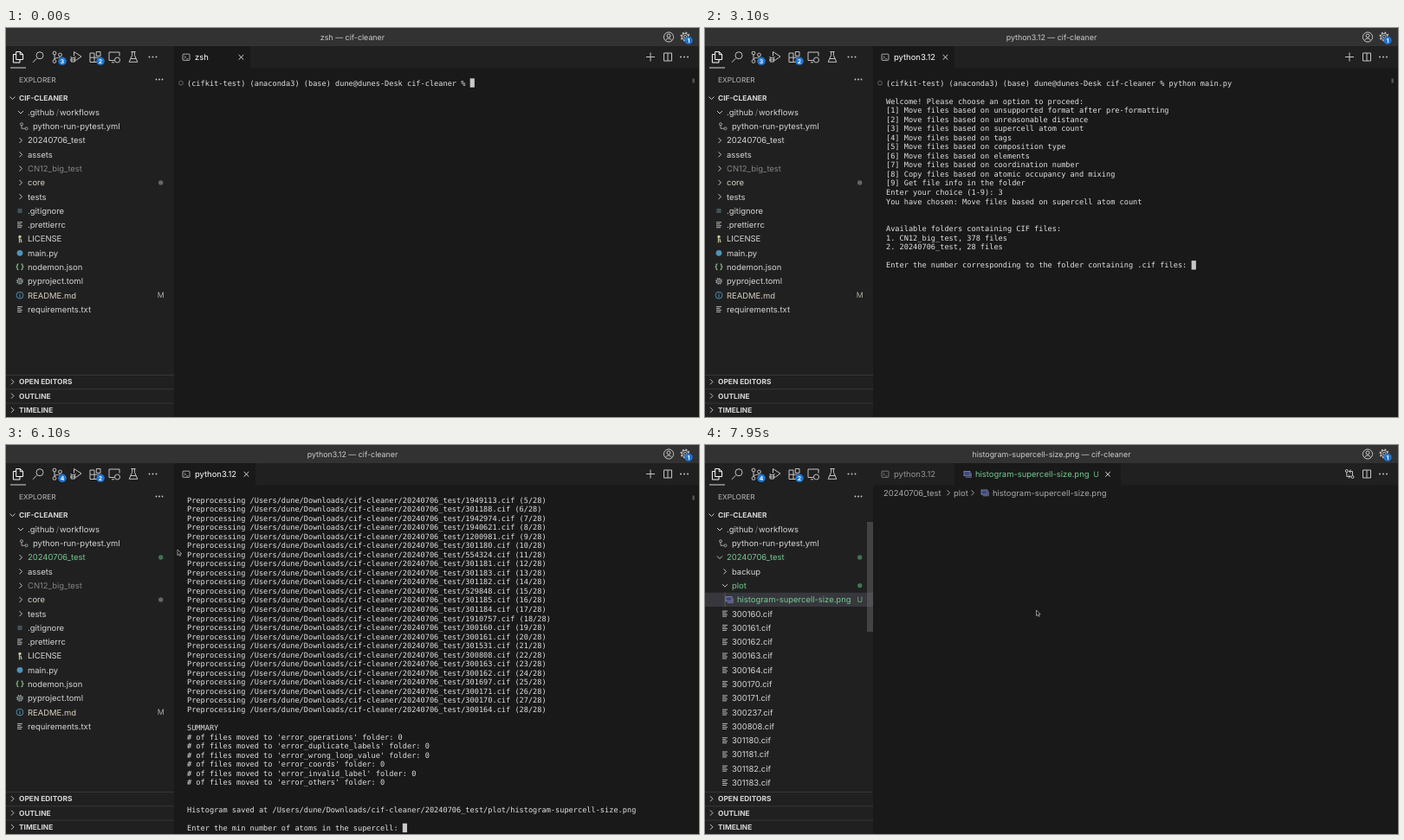
These frames come from a looping animation (800x450 px, 8 s). An HTML page:

```html
<!DOCTYPE html>
<html lang="en">
<head>
<meta charset="utf-8">
<title>Terminal session</title>
<style>
html, body { margin: 0; width: 100%; height: 100%; overflow: hidden; background: #191919; }
svg { display: block; width: 100vw; height: 100vh; }
text { font: 9.45px Inter, sans-serif; white-space: pre; text-rendering: geometricPrecision; }
.term text { font: 8.62px "DejaVu Sans Mono", monospace; fill: #e2e2e2; }
</style>
</head>
<body>
<svg id="stage" viewBox="0 0 800 450"></svg>
<script>
const LOOP = 8000, TICK = 50;
const ROW = 16.28, LINE = 10.54, CHAR = 5.19, ROWS = 37;
const GREEN = '#73c991', TAN = '#d8d1bd', GREY = '#c5c5c5', TEXT = '#d6d6d6', SIDE = '#202021', EDIT = '#191919';
const PNG = 'histogram-supercell-size.png';
const ROOT = '/Users/dune/Downloads/cif-cleaner/20240706_test';

// Terminal contents
const PROMPT = '(cifkit-test) (anaconda3) (base) dune@dunes-Desk cif-cleaner % ';
const CIFS = ('300237 301710 1955459 RhSb2 1949113 301188 1942974 1940621 1200981 301180 554324 301181 ' +
  '301183 301182 529848 301185 301184 1910757 300160 300161 301531 300808 300163 300162 301697 ' +
  '300171 300170 300164').split(' ');
const numbered = list => list.map((s, i) => `[${i + 1}] ${s}`);
const LOG = [
  PROMPT + 'python main.py', '',
  'Welcome! Please choose an option to proceed:',
  ...numbered(['unsupported format after pre-formatting', 'unreasonable distance', 'supercell atom count',
    'tags', 'composition type', 'elements', 'coordination number'].map(s => 'Move files based on ' + s)
    .concat('Copy files based on atomic occupancy and mixing', 'Get file info in the folder')),
  'Enter your choice (1-9): 3',
  'You have chosen: Move files based on supercell atom count', '', '',
  'Available folders containing CIF files:',
  '1. CN12_big_test, 378 files',
  '2. 20240706_test, 28 files', '',
  'Enter the number corresponding to the folder containing .cif files: 2',
  '='.repeat(26) + 'SUPERCELL' + '='.repeat(29),
  'Process for this option:', '',
  ...numbered(['Compute the number of atoms in the supercell for each .cif file',
    'View histogram of supercell atom counts', 'Enter the supercell min and max atom counts',
    'Move files above the min and below the max to separate folder']),
  '='.repeat(66), '', '',
  `CIF Preprocessing in ${ROOT} begun...`, '',
  ...CIFS.map((c, i) => `Preprocessing ${ROOT}/${c}.cif (${i + 1}/28)`), '',
  'SUMMARY',
  ...['operations', 'duplicate_labels', 'wrong_loop_value', 'coords', 'invalid_label', 'others']
    .map(s => `# of files moved to 'error_${s}' folder: 0`), '', '',
  `Histogram saved at ${ROOT}/plot/${PNG}`, '',
  'Enter the min number of atoms in the supercell: '
];

// Drawing helpers
const esc = s => s.replace(/&/g, '&amp;').replace(/</g, '&lt;');
const rect = (x, y, w, h, fill, more = '') => `<rect x="${x}" y="${y}" width="${w}" height="${h}" fill="${fill}" ${more}/>`;
const dot = (x, y, r, fill, more = '') => `<circle cx="${x}" cy="${y}" r="${r}" fill="${fill}" ${more}/>`;
const ring = (x, y, r, c, w = 1) => dot(x, y, r, 'none', `stroke="${c}" stroke-width="${w}"`);
const line = (d, x, y, c = GREY, w = 1) =>
  `<path d="${d}" transform="translate(${x} ${y})" fill="none" stroke="${c}" stroke-width="${w}"/>`;
const text = (x, y, s, fill = TEXT, size = 9.45, more = '') =>
  `<text x="${x}" y="${y + size * .36}" style="fill:${fill};font-size:${size}px;${more}">${esc(s)}</text>`;
const BOLD = 'font-weight:700;';
const MID = 'text-anchor:middle;';

const dots = (x, y, gap = 4) => [-gap, 0, gap].map(d => dot(x + d, y, .95, GREY)).join('');
const chevron = (x, y, open, c = GREY) => line(open ? 'M-3-1.5L0 1.5L3-1.5' : 'M-1.5-3L1.5 0L-1.5 3', x, y, c);
const cross = (x, y) => line('M-2.8-2.8L2.8 2.8M2.8-2.8L-2.8 2.8', x, y, '#ddd');
const badge = (x, y, n, r = 4.8) => dot(x, y, r, '#1f75cf') + text(x, y, n, '#fff', 6.8, BOLD + MID);
const gear = (x, y, r, c) => ring(x, y, r * .8, c, .9) + ring(x, y, r * .35, c, .9) +
  dot(x, y, r, 'none', `stroke="${c}" stroke-width="${r * .4}" stroke-dasharray="${r * .39}"`);
const picture = (x, y) => rect(x - 4, y - 3.3, 7, 5.2, '#3a4a78', 'stroke="#8f86bd" stroke-width=".8"') +
  line('M-2 3.5H4.2V-1.5', x, y, '#8f86bd', .8);
const shell = (x, y, c) => rect(x - 4, y - 3.6, 8, 7.2, 'none', `rx=".8" stroke="${c}" stroke-width=".8"`) +
  line('M-2.3-1.7L-.6 0L-2.3 1.7M.2 2H2.3', x, y, c, .8);
const split = (x, y) => line('M-4.5-4.5H4.5V4.5H-4.5zM0-4.5V4.5', x, y);

const FILE_ICONS = {
  flow: (x, y) => ring(x - 2.5, y - 2.5, 1.5, '#a9b0b3', .9) + ring(x + 3, y + 2.5, 1.5, '#a9b0b3', .9) +
    line('M-2.5-1V2.5H1.5', x, y, '#a9b0b3', .9),
  text: (x, y) => line('M-3-3H3M-3-1H1.5M-3 1H3M-3 3H2', x, y, '#c3c7c9', .9),
  git: (x, y) => rect(x - 2.6, y - 2.6, 5.2, 5.2, '#41535b'),
  key: (x, y) => dot(x, y - 2.5, 1.7, '#cbcb9a') + line('M-.5-1V4.5M1 0L2 4', x, y, '#b9bb98', 1.3),
  py: (x, y) => dot(x, y, 3.4, '#4f93b8'),
  json: (x, y) => text(x, y - .3, '{ }', '#8dc18a', 8.5, BOLD + MID),
  gear: (x, y) => gear(x, y, 3.3, '#9aa5a8'),
  info: (x, y) => ring(x, y, 3.9, '#519aba', .9) + line('M0-.8V2.4M0-2.4V-1.5', x, y, '#519aba', 1),
  png: picture
};

function titleBar(title) {
  return rect(0, 0, 800, 21, '#323233') + text(400, 10.5, title, '#ccc', 8.9, MID) +
    ring(765, 10.5, 5.6, GREY) + ring(765, 9, 2, GREY) + line('M-3.6 4.2C-2 .6 2 .6 3.6 4.2', 765, 10.5) +
    gear(784, 10, 4.6, GREY) + badge(788, 14.3, '1', 4.6);
}

function activityBar(changes) {
  const y = 33.5;
  return line('M-2.3-6H2.5L5.6-3V3H-2.3zM-2.3-3H-5.6V6.5H2V3M2.3-6V-2.8H5.6', 14, y, '#fff') +
    rect(5, 45.5, 18, 1, '#d8d8d8') +
    line('M-1.7 1.7L-6 6.3M6-1.8A4 4 0 1 1-2-1.8A4 4 0 1 1 6-1.8', 37, y) +
    ring(56, 29, 1.9, GREY) + ring(56, 38.5, 1.9, GREY) + ring(62.5, 31, 1.9, GREY) +
    line('M-3-2.6V3M3.5-.6C3.5 2-3 0-3 3', 59, y) + badge(65, 38.3, changes) +
    line('M-2.5-1V-6L6-.5L-.5 4M-5.8 1.2H-1.5V5.5H-5.8zM-7 3.4H-.5M-6.5-.5L-5 1.2M-.5-.5L-2 1.2', 81, y) +
    line('M-6-4.5H-1V6H-6zM-6 .7H4.5V6H-1M1.3-6H6V-1.2H1.3z', 103, y) + badge(109, 38.3, '2') +
    line('M0 4H-6V-5.5H6V-1M-3 6.3H0', 125, y) + ring(128.5, 37, 3, GREY) +
    line('M-2.6-6H2.6M-1.4-6V-2L-4.8 5.8H4.8L1.4-2V-6M-3 2H3', 147, y) + dots(169.5, y);
}

// Explorer rows: [name, icon or open flag, depth, colour, mark]
function treeRows(s) {
  const head = [['.github/workflows', true, 0], ['python-run-pytest.yml', 'flow', 1]];
  const mark = s.tracked ? 'dot' : '';
  const folder = ['20240706_test', s.open, 0, s.tracked ? GREEN : TEXT, mark];
  if (s.open) {
    const files = '300160 300161 300162 300163 300164 300170 300171 300237 300808 301180 301181 301182 301183 301184';
    return [...head, folder, ['backup', false, 1],
      ['plot', s.plot, 1, s.picked === 4 ? '#fff' : GREEN, 'dot'],
      ...(s.plot ? [[PNG, 'png', 2, GREEN, 'U']] : []),
      ...files.split(' ').map(n => [n + '.cif', 'text', 1])].slice(0, 19);
  }
  return [...head, folder, ['assets', false, 0], ['CN12_big_test', false, 0, '#828282'],
    ['core', false, 0, TAN, 'dot'], ['tests', false, 0], ['.gitignore', 'git', 0], ['.prettierrc', 'text', 0],
    ['LICENSE', 'key', 0], ['main.py', 'py', 0], ['nodemon.json', 'json', 0], ['pyproject.toml', 'gear', 0],
    ['README.md', 'info', 0, TAN, 'M'], ['requirements.txt', 'text', 0]];
}

function treeRow([name, kind, depth, color = TEXT, mark], i, s) {
  const y = 97.5 + i * ROW, top = y - ROW / 2, x = 25 + depth * 6;
  let out = '';
  if (s.picked === i) {
    out += s.dropped ? rect(0, top, 194, ROW, '#37373d')
      : rect(.5, top + .5, 193, ROW - 1, '#04395e', 'stroke="#2478bd"');
  } else if (s.hover === i) out += rect(0, top, 194, ROW, '#2a2d2e');
  if (depth === 2) out += rect(22.7, top, .7, ROW, '#666');
  out += typeof kind === 'boolean' ? chevron(x - 8, y, kind, i === s.picked ? '#fff' : GREY)
    : FILE_ICONS[kind](x - (depth ? (depth === 2 ? 9 : kind === 'flow' ? 10.5 : 8) : 9), y);
  if (name.includes('/')) {
    out += text(x, y, '.github') + text(57.8, y, '/', '#777') + text(62, y, 'workflows');
  } else out += text(x, y, name, color);
  if (mark === 'dot') out += dot(178.7, y, 2.7, i === s.picked ? '#8aa5b8' : color === TAN ? '#68665f' : '#417353');
  else if (mark) out += text(178.7, y, mark, mark === 'U' ? '#68b583' : '#b0aa99', 8.9, MID);
  return out;
}

function sidebar(s) {
  let out = rect(0, 21, 194, 429, SIDE) + activityBar(s.tracked ? '4' : '3') +
    text(15, 59.5, 'EXPLORER', '#bbb', 8.35) + dots(177, 59.5, 3.5) +
    chevron(7.5, 81, true) + text(15, 81, 'CIF-CLEANER', TEXT, 8.35, BOLD);
  if (s.tools) {
    out += line('M-1 4.5H-3.5V-4.5H1L3.5-2V0M1 3H5M3 1V5', 130, 80.5) +
      line('M-1 4H-5V-4H-1.5L0-2.5H5V0M1 3H5M3 1V5', 148, 80.5) +
      line('M3.5-2A4 4 0 1 0 4 1M4-4.5V-1.7H1', 166, 80.5) +
      line('M-4-1.5H2V4.5H-4zM-2-1.5V-4H4.5V2H2M-2.5 1.5H.5', 183, 80.5);
  }
  out += treeRows(s).map((r, i) => treeRow(r, i, s)).join('');
  if (s.open) out += rect(187, 89, 7, 127, '#797979', 'opacity=".4"');
  out += rect(0, 401, 194, 49, SIDE);
  ['OPEN EDITORS', 'OUTLINE', 'TIMELINE'].forEach((name, i) => {
    const y = 409.3 + i * ROW;
    out += rect(0, y - 8.2, 194, .8, '#3c3c3d') + chevron(7.5, y, false) + text(15, y, name, TEXT, 8.35, BOLD);
  });
  return out;
}

function tabs(s) {
  const end = s.running ? 288 : 282, y = 33.8;
  let out = rect(194, 21, 606, 25.5, SIDE);
  if (s.dropped) {
    return out + shell(208, y, '#8c8c8c') + text(218, y, 'python3.12', '#949494') +
      rect(288, 21, 192, 26, EDIT) + picture(303, y) + text(312, y, PNG, GREEN) +
      text(451.5, y, 'U', '#68b583', 8.9, MID) + cross(465, y) +
      ring(740.8, 30, 1.5, GREY) + ring(747.5, 37, 1.5, GREY) +
      line('M-3.2-2V3H1M-1 1L1 3L-1 5M3.5 2V-3H-.5M1.5-5L-.5-3L1.5-1', 744, 33.5) +
      split(764, 33.5) + dots(783, 33.5) +
      text(206, 55.3, '20240706_test', '#a9a9a9') + chevron(281, 55.3, false, '#a9a9a9') +
      text(287, 55.3, 'plot', '#a9a9a9') + chevron(309, 55.3, false, '#a9a9a9') +
      picture(323, 55.3) + text(332, 55.3, PNG, '#a9a9a9');
  }
  out += rect(194, 21, end - 194, 26, EDIT) + shell(208, y, '#ccc') +
    text(218, y, s.running ? 'python3.12' : 'zsh', '#fff') + cross(end - 10.5, y);
  return out + line('M-5 0H5M0-5V5', 744, 33.5) + split(764, 33.5) + dots(783, 33.5);
}

// Cursor row and how many characters of that row are shown
function cursorAt(t) {
  if (t < 1250) return [0, PROMPT.length + Math.max(0, Math.min(14, Math.floor((t - 300) / 56) + 1))];
  if (t < 2100) return [1, 0];
  if (t < 3100) return [12, t < 2900 ? 25 : 26];
  if (t < 4550) return [20, t < 3800 ? 68 : 69];
  if (t < 4800) return [35 + Math.floor((t - 4550) * .115), 0];
  if (t < 5100) return [69, 0];
  return [73, LOG[73].length];
}

function terminal(t, s) {
  const [row, col] = cursorAt(t), top = Math.max(0, row - ROWS + 1);
  let out = '<g class="term">';
  for (let r = top; r <= row; r++) {
    const str = r === row ? LOG[r].slice(0, col) : LOG[r];
    if (str) out += `<text x="209" y="${(66.5 + (r - top) * LINE).toFixed(2)}">${esc(str)}</text>`;
  }
  out += '</g>';
  const cx = 208.7 + col * CHAR, cy = 58.3 + (row - top) * LINE;
  out += s.open ? rect(cx + .4, cy + .4, 4.6, 9.6, 'none', 'stroke="#c8c8c8" stroke-width=".8"')
    : rect(cx, cy, 5.2, 10.4, '#c8c8c8');
  if (!top) out += ring(202, 63.7, 2.4, '#6a6a6a', .9);
  out += rect(792.5, 58.5, 2.2, 5, '#5c5c5c');
  if (top && t < 5500) {
    const k = 392 / (row + 1);
    out += rect(797.7, 58 + top * k, 2.3, ROWS * k, '#797979', `opacity="${t < 5450 ? .5 : .25}"`);
  }
  return out;
}

// Pointer path: [time, x, y]
const PATH = [[5750, 288, 211], [6100, 198, 121], [6400, 112, 128], [6600, 100, 130], [6850, 72, 159],
  [7000, 68, 161], [7200, 92, 178], [7250, 96, 179], [7700, 380, 193], [7950, 382.5, 191]];
function pointerAt(t) {
  const i = PATH.findIndex(p => p[0] > t);
  if (i < 0) return PATH[PATH.length - 1].slice(1);
  if (i === 0) return PATH[0].slice(1);
  const [a, b] = [PATH[i - 1], PATH[i]];
  let k = (t - a[0]) / (b[0] - a[0]);
  k = i === 1 ? k : k * k * (3 - 2 * k);
  return [a[1] + (b[1] - a[1]) * k, a[2] + (b[2] - a[2]) * k];
}

const ibeam = (x, y) => line('M-1.5-3.2Q0-3.2 0-2V2Q0 3.2-1.5 3.2M1.5-3.2Q0-3.2 0-2M0 2Q0 3.2 1.5 3.2', x, y, '#ccc', .8);
const arrow = (x, y) => `<path d="M0 0V6.6L1.5 5.3L2.5 7.4L3.6 6.9L2.7 4.8H4.7Z" transform="translate(${x} ${y})" fill="#111" stroke="#ddd" stroke-width=".6"/>`;

function pointer(t, s) {
  if (t >= 2100 && t < 2900) return ibeam(381, 342);
  if (t < 5750) return '';
  const [x, y] = pointerAt(t);
  if (x > 202 && t < 6100) return ibeam(x, y);
  let out = '';
  if (s.dragging) {
    out += rect(x - 4, y + 3, 133, 13, '#04395e', 'rx="6.5" stroke="#155a8c" stroke-width=".7"') +
      text(x, y + 9.6, PNG, '#fff', 8.85);
  }
  out += arrow(x, y);
  if (s.dragging) out += dot(x + 4, y + 5, 3.2, '#5fae5a') + line('M-1.8 0H1.8M0-1.8V1.8', x + 4, y + 5, '#e4f2e2', .8);
  return out;
}

function render(t) {
  const s = {
    running: t >= 1400, tracked: t >= 5900, open: t >= 6600, plot: t >= 7000,
    dragging: t >= 7250 && t < 7900, dropped: t >= 7900, tools: t >= 6150 && t < 7900
  };
  s.picked = s.dropped ? 5 : s.plot ? 4 : s.open ? 2 : -1;
  s.hover = -1;
  if (s.tools && !s.dragging) {
    const [x, y] = pointerAt(t);
    if (x < 194) s.hover = Math.round((y - 97.5) / ROW);
  }
  // Drop area lights up while a file is held over it
  const dropArea = s.dragging && t >= 7450 ? rect(194, 46.5, 606, 403.5, '#53595d', 'opacity=".2"') : '';
  const name = s.dropped ? PNG : s.running ? 'python3.12' : 'zsh';
  return rect(0, 0, 800, 450, EDIT) + titleBar(name + ' — cif-cleaner') + sidebar(s) + tabs(s) +
    (s.dropped ? '' : terminal(t, s)) + dropArea + pointer(t, s);
}

const stage = document.getElementById('stage');
let last = -1;
function tick() {
  const t = Math.floor(performance.now() % LOOP / TICK) * TICK;
  if (t !== last) stage.innerHTML = render(last = t);
  requestAnimationFrame(tick);
}
tick();
</script>
</body>
</html>
```
